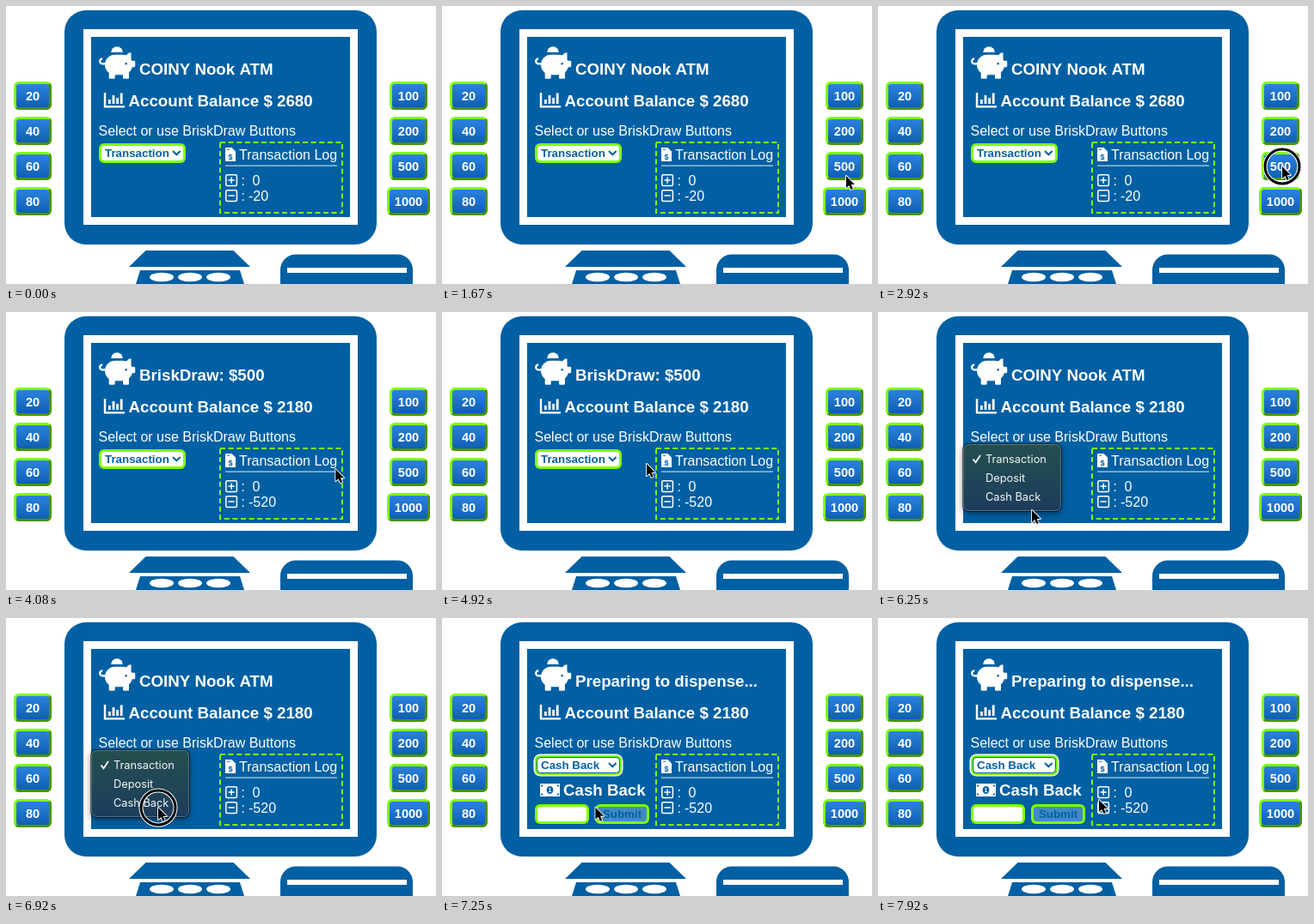
An HTML page with a canvas that plays this animation: 500x324 px, repeating every 8 s.

```html
<!DOCTYPE html>
<html lang="en">
<head>
<meta charset="utf-8">
<title>ATM demo</title>
<style>
html, body { margin: 0; width: 100%; height: 100%; overflow: hidden; background: #fff; }
canvas { display: block; width: 500px; height: 324px; }
</style>
</head>
<body>
<canvas id="stage"></canvas>
<script>
const canvas = document.getElementById('stage');
const ctx = canvas.getContext('2d');
const ratio = window.devicePixelRatio || 1;
canvas.width = 500 * ratio;
canvas.height = 324 * ratio;

const LOOP = 8000;
const BLUE = '#0060a3', LIME = '#7fff00', WHITE = '#fff';
const SANS = '"Liberation Sans", Arial, sans-serif';
const HEAD = `bold 18.72px ${SANS}`;
const BODY = `16px ${SANS}`;
const SMALL = `bold 13.33px ${SANS}`;

const PAID = 3000, RESET = 6000, OPEN = 5500, CHOSEN = 7050;
const PRESS = 200;

// Each move starts at a time, lasts a while and ends on a point.
const START = { x: 506, y: 296 };
const MOVES = [
  { at: 850, lasts: 650, x: 470, y: 198 },
  { at: 2250, lasts: 450, x: 470, y: 187 },
  { at: 3500, lasts: 1400, x: 238, y: 177 },
  { at: 4950, lasts: 400, x: 180, y: 173 },
  { at: 5600, lasts: 550, x: 179, y: 231 },
  { at: 6450, lasts: 400, x: 177, y: 221 },
  { at: 7200, lasts: 650, x: 257, y: 212 }
];
const ARROW = new Path2D('M0 0V14L3.2 11L5.5 16L7.8 15L5.6 10H9.8Z');

function text(str, x, y, font, color = WHITE, align = 'left') {
  ctx.font = font;
  ctx.fillStyle = color;
  ctx.textAlign = align;
  ctx.fillText(str, x, y);
}

function rect(x, y, w, h, color) {
  ctx.fillStyle = color;
  ctx.fillRect(x, y, w, h);
}

function round(x, y, w, h, r, color) {
  ctx.beginPath();
  ctx.roundRect(x, y, w, h, r);
  ctx.fillStyle = color;
  ctx.fill();
}

function outline(x, y, w, h, r, color, width = 1) {
  ctx.beginPath();
  ctx.roundRect(x, y, w, h, r);
  ctx.strokeStyle = color;
  ctx.lineWidth = width;
  ctx.stroke();
}

function poly(color, ...pts) {
  ctx.beginPath();
  pts.forEach(([x, y]) => ctx.lineTo(x, y));
  ctx.closePath();
  ctx.fillStyle = color;
  ctx.fill();
}

function line(color, width, ...pts) {
  ctx.beginPath();
  pts.forEach(([x, y]) => ctx.lineTo(x, y));
  ctx.strokeStyle = color;
  ctx.lineWidth = width;
  ctx.stroke();
}

function ellipse(x, y, rx, ry, color) {
  ctx.beginPath();
  ctx.ellipse(x, y, rx, ry, 0, 0, Math.PI * 2);
  ctx.fillStyle = color;
  ctx.fill();
}

function ring(x, y, r, color, width) {
  ctx.beginPath();
  ctx.arc(x, y, r, 0, Math.PI * 2);
  ctx.strokeStyle = color;
  ctx.lineWidth = width;
  ctx.stroke();
}

// A trapezoid centred on cx
function taper(cx, y, top, bottom, h) {
  poly(BLUE, [cx - top / 2, y], [cx + top / 2, y], [cx + bottom / 2, y + h], [cx - bottom / 2, y + h]);
}

function shade(y, h, top, bottom) {
  const g = ctx.createLinearGradient(0, y, 0, y + h);
  g.addColorStop(0, top);
  g.addColorStop(1, bottom);
  return g;
}

function cashButton(label, cx, y, w) {
  const x = cx - w / 2, h = 33;
  round(x, y, w, h, 6, LIME);
  ctx.save();
  ctx.clip();
  poly('#469400', [x, y + h], [x + 4, y + h - 4], [x + w - 4, y + 4], [x + w, y], [x + w, y + h]);
  ctx.restore();
  round(x + 3, y + 3, w - 6, h - 6, 3, shade(y, h, '#2f86e4', '#0b5cab'));
  text(label, cx, y + 21.5, `bold 14.6px ${SANS}`, WHITE, 'center');
}

function field(x, y, w, h, fill) {
  round(x, y, w, h, 6, LIME);
  round(x + 3, y + 3, w - 6, h - 6, 3, fill);
}

function machine() {
  round(68, 5, 363, 273, 25, BLUE);
  rect(90, 27, 319, 228, WHITE);
  rect(99, 36, 301, 210, BLUE);

  taper(213.5, 285, 102, 141, 19);
  taper(214, 308, 116, 126, 16);
  for (let i = -1; i <= 1; i++) ellipse(214 + 33 * i, 316, 14, 5.3, WHITE);

  round(319, 289.5, 154, 50, 18, BLUE);
  rect(327, 305, 139, 6, WHITE);

  for (let i = 0; i < 4; i++) {
    const y = 88 + 41 * i;
    cashButton(20 * (i + 1), 31, y, 44);
    cashButton([100, 200, 500, 1000][i], 468, y, i < 3 ? 44 : 50);
  }
}

function pig() {
  ctx.beginPath();
  ctx.arc(129, 54, 6.8, Math.PI, 0);
  ctx.fillStyle = WHITE;
  ctx.fill();
  round(115, 56.8, 32, 23.4, 11.7, WHITE);
  round(140, 63.8, 10.2, 7.4, 1.2, WHITE);
  poly(WHITE, [137, 60], [143, 54.4], [145.5, 54.4], [145.5, 65]);
  [119.7, 136].forEach(x => round(x, 72, 7, 12.8, 1.2, WHITE));
  ellipse(139.6, 67.3, 1.2, 1.2, BLUE);
  ctx.beginPath();
  ctx.arc(112.2, 64.4, 3, -Math.PI / 2, Math.PI / 2, true);
  ctx.lineTo(116, 67.4);
  ctx.strokeStyle = WHITE;
  ctx.lineWidth = 2.3;
  ctx.stroke();
}

function chart() {
  line(WHITE, 2.4, [115, 101], [115, 117.4], [138, 117.4]);
  [5, 10, 7, 12.5].forEach((h, i) => rect(119 + 4.6 * i, 114 - h, 2.8, h, WHITE));
}

function signBox(y, plus) {
  outline(255.8, y + 0.8, 12.6, 12.6, 1.5, WHITE, 1.5);
  line(WHITE, 1.5, [258.4, y + 7], [265.8, y + 7]);
  if (plus) line(WHITE, 1.5, [262.1, y + 3.4], [262.1, y + 10.8]);
}

function log(spent) {
  ctx.setLineDash([6, 3.6]);
  outline(249, 159, 142, 82, 0, LIME, 2);
  ctx.setLineDash([]);

  rect(255, 165, 12, 16, WHITE);
  poly(BLUE, [262.5, 165], [267, 165], [267, 169.5]);
  line(BLUE, 0.8, [257, 167.4], [260, 167.4]);
  text('$', 261, 179, `bold 9px ${SANS}`, BLUE, 'center');
  text('Transaction Log', 271, 179, BODY);
  rect(255, 185.5, 130, 1.2, 'rgba(255,255,255,.75)');

  [['0', 286.5], ['-' + spent, 282]].forEach(([value, x], i) => {
    const y = 196 + 18 * i;
    signBox(y, i === 0);
    text(':', 273.5, y + 13, BODY);
    text(value, x, y + 13, BODY);
  });
}

function picker(label, focused) {
  if (focused) round(106.5, 158.5, 104, 26, 8, WHITE);
  field(108, 160, 101, 23, WHITE);
  if (focused) outline(110.5, 162.5, 96, 18, 4, BLUE);
  text(label, 115, 176, SMALL, BLUE);
  line(BLUE, 2, [194, 169], [198.3, 173.3], [202.6, 169]);
}

function menu() {
  ctx.save();
  ctx.shadowColor = 'rgba(0,0,0,.45)';
  ctx.shadowBlur = 9 * ratio;
  ctx.shadowOffsetY = 3 * ratio;
  round(99, 154, 114, 78, 6, '#1d4258');
  ctx.restore();
  round(99, 154, 114, 78, 6, shade(154, 78, '#23504f', '#1d3c5c'));
  outline(98.5, 153.5, 115, 79, 6.5, 'rgba(0,0,0,.6)');
  outline(99.5, 154.5, 113, 77, 6, 'rgba(150,175,185,.45)');
  ['Transaction', 'Deposit', 'Cash Back'].forEach((s, i) =>
    text(s, 125, 176 + 22 * i, '12.8px Inter, sans-serif', '#f4f7f8'));
  line(WHITE, 1.8, [110.5, 171.5], [113.5, 175.3], [119, 167]);
}

function cashForm() {
  rect(114, 193, 23, 15, WHITE);
  ctx.save();
  ctx.beginPath();
  ctx.rect(115.2, 194.4, 20.6, 12.2);
  ctx.clip();
  for (const x of [114, 137]) for (const y of [193, 208]) ellipse(x, y, 4, 4, BLUE);
  ctx.restore();
  ellipse(125.5, 200.5, 3.8, 4.6, BLUE);
  text('1', 125.5, 203.2, `bold 7px ${SANS}`, WHITE, 'center');
  text('Cash Back', 141, 207, HEAD);
  field(108, 217, 63, 23, WHITE);
  field(178, 217, 63, 23, '#428ac3');
  text('Submit', 209.5, 233, SMALL, BLUE, 'center');
}

function tipAt(t) {
  let { x, y } = START;
  for (const m of MOVES) {
    const p = Math.min(1, Math.max(0, (t - m.at) / m.lasts));
    const e = p * p * (3 - 2 * p);
    x += (m.x - x) * e;
    y += (m.y - y) * e;
  }
  return [x, y];
}

function pointer(t) {
  if (t < MOVES[0].at) return;
  const [x, y] = tipAt(t);
  if ([PAID, OPEN, CHOSEN].some(end => t >= end - PRESS && t < end)) {
    ring(x, y, 20, WHITE, 5);
    ring(x, y, 20, '#000', 3);
  }
  ctx.save();
  ctx.translate(x, y);
  ctx.lineJoin = 'round';
  ctx.strokeStyle = WHITE;
  ctx.lineWidth = 1.8;
  ctx.stroke(ARROW);
  ctx.fillStyle = '#000';
  ctx.fill(ARROW);
  ctx.restore();
}

function message(t) {
  if (t >= CHOSEN) return 'Preparing to dispense...';
  return t >= PAID && t < RESET ? 'BriskDraw: $500' : 'COINY Nook ATM';
}

function draw(t) {
  const paid = t >= PAID, chosen = t >= CHOSEN;
  ctx.setTransform(ratio, 0, 0, ratio, 0, 0);
  rect(0, 0, 500, 324, WHITE);
  machine();
  pig();
  chart();
  text(message(t), 155, 80, HEAD);
  text('Account Balance $ ' + (paid ? 2180 : 2680), 142.5, 117, HEAD);
  text('Select or use BriskDraw Buttons', 107.5, 151, BODY);
  log(paid ? 520 : 20);
  picker(chosen ? 'Cash Back' : 'Transaction', chosen);
  if (chosen) cashForm();
  else if (t >= OPEN) menu();
  pointer(t);
}

function tick() {
  draw(performance.now() % LOOP);
  requestAnimationFrame(tick);
}
tick();
</script>
</body>
</html>
```
